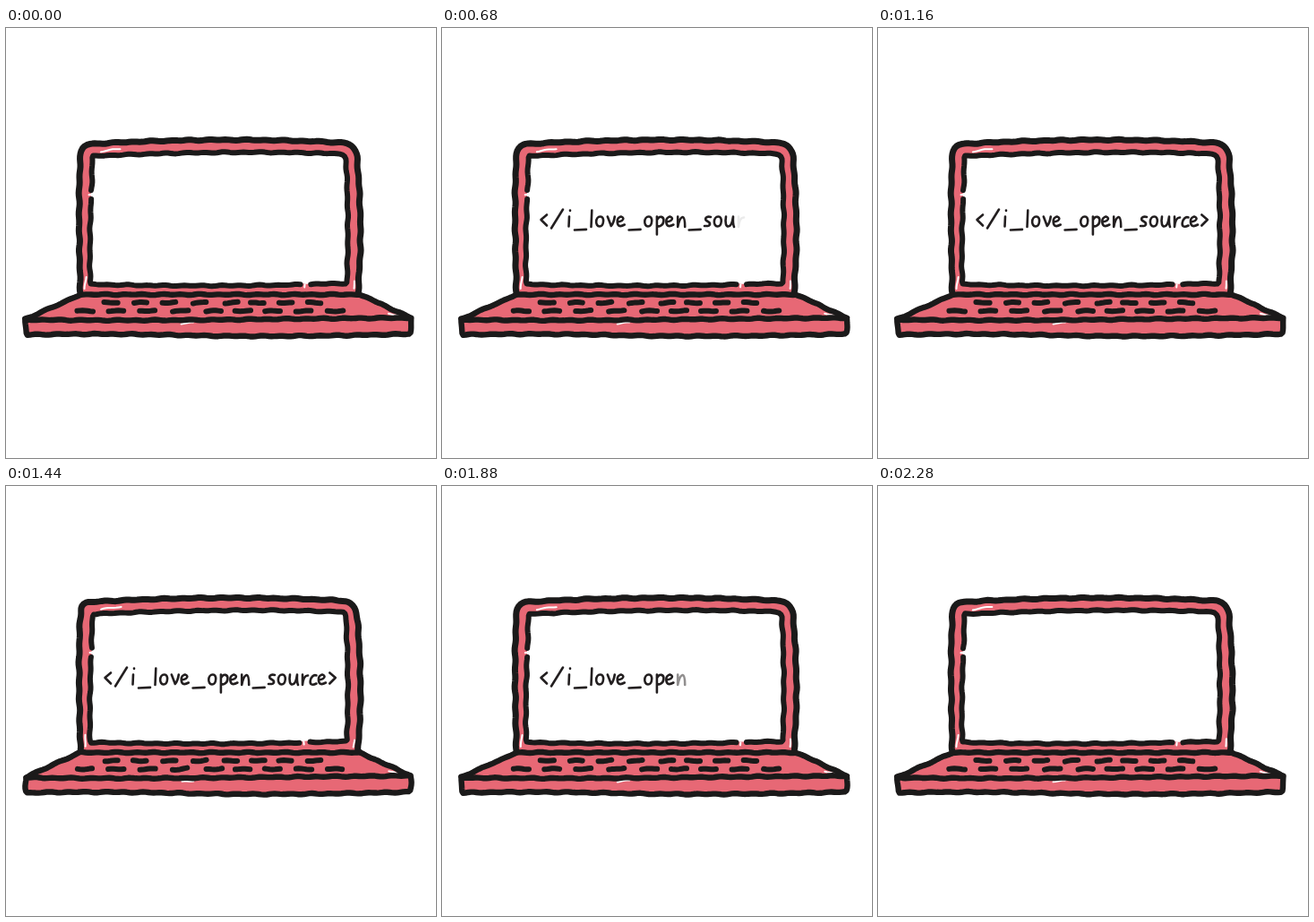
Write an HTML page that moves like this. It is 480x480 px and loops after 2360 ms.

```html
<!DOCTYPE html>
<html lang="en">
<head>
<meta charset="utf-8">
<title>Laptop typing</title>
<style>
  html, body { margin: 0; width: 100%; height: 100%; overflow: hidden; background: #fff; }
  svg { display: block; width: 100vw; height: 100vh; }
  path { fill: none; stroke-linecap: round; stroke-linejoin: round; }
  .pink { fill: #e76875; }
  .white { fill: #fff; }
  .gap { stroke: #fff; stroke-width: 2; }
  .lid { stroke: #1b1a1a; stroke-width: 7; }
  .frame, .key { stroke: #1b1a1a; stroke-width: 6; }
  .base { stroke: #1b1a1a; stroke-width: 6.4; }
  #text { stroke: #231f20; stroke-width: 2.6; }
</style>
</head>
<body>
<svg viewBox="0 0 480 480" role="img" aria-label="&lt;/i_love_open_source&gt;">
  <g id="laptop"></g>
  <g id="text"></g>
</svg>
<script>
const LOOP = 2360, STEP = 40, WOBBLE = LOOP / 4;
const CHAR = 30.4, TYPE_START = 160.4, ERASE_END = 2260;
const laptop = document.getElementById('laptop');
const text = document.getElementById('text');

function addPath(parent, attrs) {
  const el = document.createElementNS('http://www.w3.org/2000/svg', 'path');
  for (const name in attrs) el.setAttribute(name, attrs[name]);
  return parent.appendChild(el);
}

// Each laptop shape is sampled along its length so that its outline can wobble.
const shapes = [];
function shape(kind, d) {
  const el = addPath(laptop, { class: kind, d });
  const length = el.getTotalLength(), n = Math.ceil(length / 3);
  const points = Array.from({ length: n + 1 }, (_, i) => el.getPointAtLength(length * i / n));
  shapes.push({ el, points });
}

const lid = 'M83 295Q80 180 83.5 140Q84 130 94 129.5Q240 121 376 128Q390 129 392 146Q396.5 200 395.5 250L393 296';
const front = 'M22 325.5Q120 327 250 325.5T452 323.5Q453 333 451 341.5Q300 345.5 200 343T23 342.5Q21 334 22 325.5Z';

shape('pink', lid + 'Z');
shape('pink', 'M83 297H395L452 324V342L22 342V325Z');
shape('white', 'M96 143Q250 136 379 142L381 285 93 286Z');

// Spots the fill misses
shape('gap', 'M106 138Q116 135.5 128 135');
shape('gap', 'M89 278 88 291');
shape('gap', 'M389 283 388 291');
shape('gap', 'M427 318.5 437 321');
shape('gap', 'M196 330 209 329');
shape('gap', 'M93 186H97');
shape('gap', 'M333 286V289');

shape('lid', lid);
shape('frame', 'M95.5 181 96.5 143Q250 136 374 140.5 379 141 379.5 148Q383 215 380.5 285L340 286');
shape('frame', 'M95 191Q93 240 94 286Q200 289 328 286.5');
shape('base', 'M83 297.5H395');
shape('base', 'M82 298 22 325');
shape('base', 'M396 298 452 323.5');
shape('base', front);

// Evenly spaced keys, with the middle ones pushed right
function keyRow(count, left, pitch, y, length) {
  for (let i = 0; i < count; i++) {
    const x = left + pitch * i + 4.5 * Math.exp(-((i - 4) ** 2));
    const tilt = 0.8 * Math.exp(-((i - 3) ** 2));
    shape('key', `M${x} ${y + tilt}L${x + length} ${y - tilt}`);
  }
}
keyRow(8, 110, 32.4, 306.6, 14.5);
keyRow(9, 79.5, 34.9, 315.9, 17);

// Advance width and pen stroke of each letter; y runs from the baseline
const glyphs = {
  '<': [11.5, 'M7.5-14 1-8.5 7.5-2'],
  '/': [19, 'M1 1 14-20'],
  'i': [7, 'M2-12 1.5-1M3-19v.5'],
  '_': [18.3, 'M1 3 14 2.4'],
  'l': [6.5, 'M2-19 1.2-.5'],
  'o': [13, 'M5-12C-1-12-1-1 4-1S10-12 5-12'],
  'v': [10, 'M0-12 4-1.5Q7-5 8-12'],
  'e': [12.8, 'M1-6Q8-7 7.5-10C6-14 0-11 1-5Q2 1 9-3'],
  'p': [10.5, 'M1-12 1 8M1-8C4-14 9-12 8.5-7S3 0 1-2'],
  'n': [12.5, 'M1-12 1-.5Q3-11 6.5-11.5Q9-11 9-.5'],
  's': [10.5, 'M7-11.5C2-13-1-9 3-7S8-1 0-1.5'],
  'u': [13.5, 'M.5-12C-1-4 1-1 3-1Q7-1 8.5-12Q8-4 9.5-.5'],
  'r': [9, 'M1-12 1-.5Q2-11 7-11'],
  'c': [9, 'M7.5-11C1-14-4 4 7.5-2'],
  '>': [9, 'M.5-14 7-8.5 .5-2']
};
let penX = 109.5;
const letters = [...'</i_love_open_source>'].map(c => {
  const [advance, d] = glyphs[c];
  const el = addPath(text, { d, transform: `translate(${penX} 222.5)` });
  penX += advance;
  return el;
});

function wobble({ x, y }, a) {
  const dx = 0.4 * Math.sin(0.3 * y + 0.07 * x + a) + 0.25 * Math.sin(0.17 * y - 0.11 * x - a + 2);
  const dy = 0.4 * Math.sin(0.3 * x + 0.09 * y + a + 1) + 0.25 * Math.sin(0.17 * x - 0.13 * y - a);
  return (x + dx).toFixed(2) + ' ' + (y + dy).toFixed(2);
}

const clamp = v => Math.min(1, Math.max(0, v));

function draw(t) {
  const p = (t % WOBBLE) / WOBBLE;
  const angle = 2 * Math.PI * p * p * (3 - 2 * p);
  for (const { el, points } of shapes) {
    el.setAttribute('d', 'M' + points.map(pt => wobble(pt, angle)).join('L'));
  }
  const shown = Math.min(t - TYPE_START, ERASE_END - t) / CHAR;
  letters.forEach((el, i) => el.setAttribute('opacity', clamp(shown - i)));
}

function frame() {
  const t = performance.now() % LOOP;
  draw(Math.floor(t / STEP) * STEP);
  requestAnimationFrame(frame);
}
frame();
</script>
</body>
</html>
```
